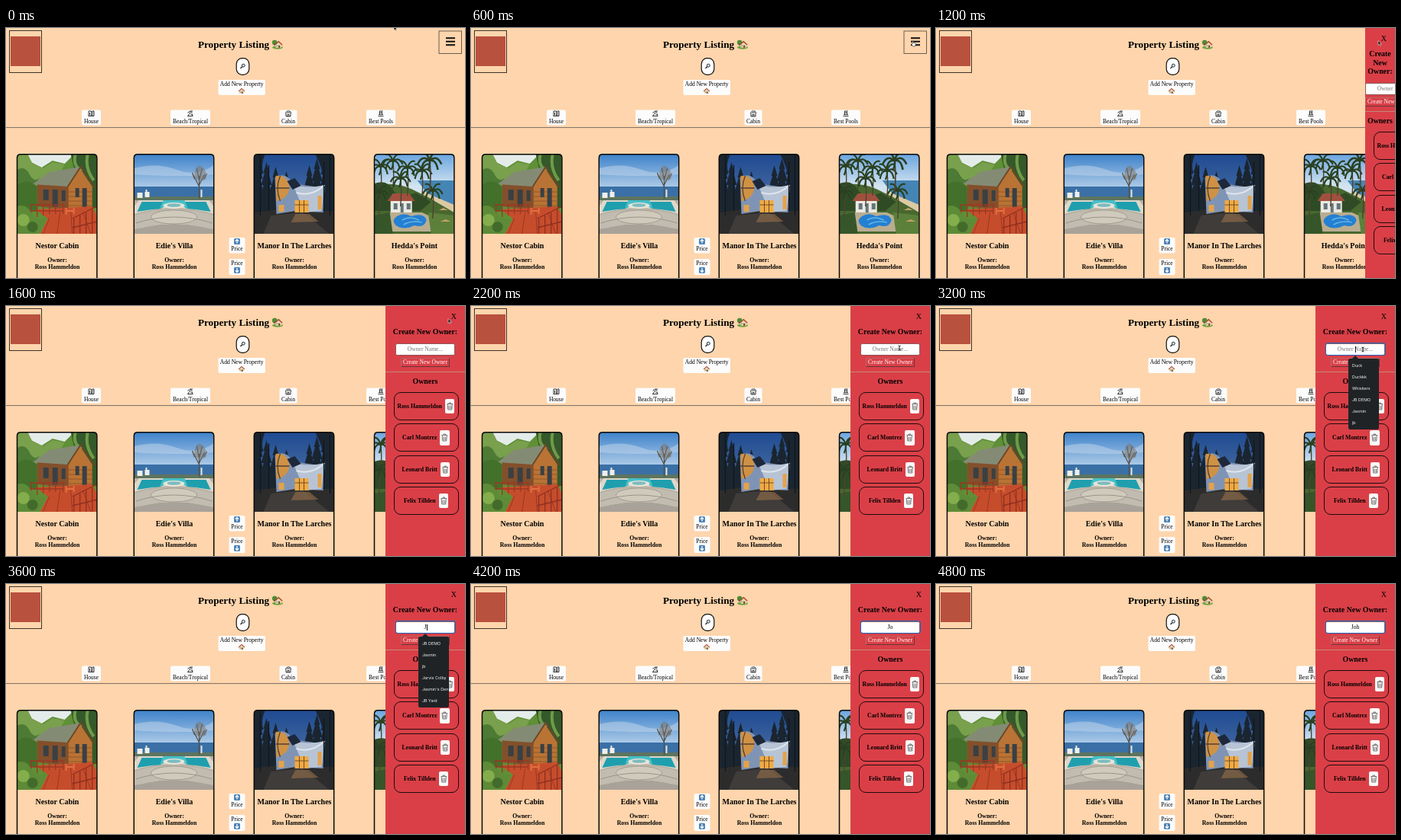
These frames come from a looping animation (600 px wide and 328 px high, 5 s). An HTML page:

```html
<!DOCTYPE html>
<html lang="en">
<head>
<meta charset="utf-8">
<title>Property Listing</title>
<style>
html, body { margin: 0; width: 100%; height: 100%; overflow: hidden; background: #fed5ac; }
.stage { position: relative; width: 600px; height: 328px; overflow: hidden; font: 7.5px "Liberation Serif", Times, serif; color: #000; }
.stage > svg { position: absolute; left: 0; top: 0; }
text { text-anchor: middle; }
.title { font-weight: bold; font-size: 13.2px; }
.name { font-weight: bold; font-size: 10px; }
.owner { font-weight: bold; font-size: 7.8px; }
.btn { fill: #fcfcfc; }
.line { fill: none; stroke: #222; stroke-width: .9; }

/* Sliding panel */
.panel { position: absolute; right: 0; top: 0; height: 328px; overflow: hidden; background: #da3f47; text-align: center; }
.panel h2 { margin: 0; font: bold 9.9px/11.5px "Liberation Serif", Times, serif; }
.panel h2:first-of-type { margin-top: 28.4px; }
.close { position: absolute; right: 11px; top: 8px; font-size: 10px; line-height: 12px; }
.field { position: relative; box-sizing: border-box; width: 78px; height: 16px; margin: 9.1px auto 0; background: #fff; border: 1px solid #8a5a5c; border-radius: 2.5px; font-size: 7.6px; line-height: 14px; }
.field span { position: absolute; left: 0; right: 0; top: 0; white-space: nowrap; }
.hint { color: #777; }
.field i { position: absolute; left: 38px; top: 3px; width: .8px; height: 8px; background: #111; }
.field i.after { left: 40px; }
.ring { position: absolute; inset: -1.5px; border: 1.8px solid #2467bd; border-radius: 3px; }
.create { box-sizing: border-box; width: 64px; height: 12.5px; margin: 3px auto 0; border: 1px outset #b56a6c; color: #fff; line-height: 10.5px; white-space: nowrap; }
.rule { height: 1px; margin: 5.5px 0 6px; background: #c58a78; }
.items { margin: 8.5px 0 0 10.5px; }
.item { box-sizing: border-box; display: flex; align-items: center; justify-content: center; width: 85px; height: 37px; margin-bottom: 4.4px; border: 1.3px solid #1c0c0d; border-radius: 9px; font-weight: bold; font-size: 7.75px; white-space: nowrap; }
.item svg { flex: none; width: 12.5px; height: 19.5px; margin-left: 4px; background: #fafafa; border-radius: 2px; }

/* Autofill list */
.list text { font: 5.4px Inter, "Liberation Sans", sans-serif; fill: #f2f2f2; text-anchor: start; }

/* One shared five second clock */
.panel, .hint, .field i, .ring, .t1, .t2, .t3, .list, .all, .recent, .cursor, .arrow, .hand, .beam { animation: 5s step-end infinite; }
.panel { animation-name: slide; }
.hint, .all { animation-name: hint; }
.ring { animation-name: focus; }
.field i { animation-name: blink; }
.field i.after, .t1, .recent { animation-name: one; }
.t2 { animation-name: two; }
.t3 { animation-name: three; }
.list { animation-name: list; }
.cursor { animation-name: move; }
.arrow { animation-name: arrow; }
.hand { animation-name: hand; }
.beam { animation-name: beam; }
@keyframes slide { 0% { width: 0 } 24% { width: 39px } 28% { width: 92px } 32%, 100% { width: 104px } }
@keyframes hint { 0% { opacity: 1 } 68%, 100% { opacity: 0 } }
@keyframes focus { 0% { opacity: 0 } 48%, 100% { opacity: 1 } }
@keyframes blink { 0% { opacity: 0 } 48% { opacity: 1 } 56% { opacity: 0 } 64% { opacity: 1 } 68%, 100% { opacity: 0 } }
@keyframes one { 0% { opacity: 0 } 68% { opacity: 1 } 76%, 100% { opacity: 0 } }
@keyframes two { 0% { opacity: 0 } 76% { opacity: 1 } 96%, 100% { opacity: 0 } }
@keyframes three { 0% { opacity: 0 } 96%, 100% { opacity: 1 } }
@keyframes list { 0% { opacity: 0 } 52% { opacity: 1 } 76%, 100% { opacity: 0 } }
@keyframes move {
  0% { transform: translate(507px, -3px) }
  4% { transform: translate(545px, 9px) }
  8% { transform: translate(576px, 16px) }
  12% { transform: translate(576px, 17px) }
  24% { transform: translate(578px, 16.5px) }
  36% { transform: translate(582px, 32px) }
  40% { transform: translate(572px, 45px) }
  44% { transform: translate(560px, 55px) }
  48%, 100% { transform: translate(558px, 57px) }
}
@keyframes arrow { 0% { opacity: 1 } 8% { opacity: 0 } 24% { opacity: 1 } 44%, 100% { opacity: 0 } }
@keyframes hand { 0% { opacity: 0 } 8% { opacity: 1 } 24%, 100% { opacity: 0 } }
@keyframes beam { 0% { opacity: 0 } 44% { opacity: 1 } 72%, 100% { opacity: 0 } }
</style>
</head>
<body>
<div class="stage">
<svg width="600" height="328" viewBox="0 0 600 328">
  <defs>
    <linearGradient id="day" x2="0" y2="1"><stop stop-color="#3f83cb"/><stop offset=".4" stop-color="#a9c8e6"/></linearGradient>
    <linearGradient id="dusk" x2="0" y2="1"><stop stop-color="#1f4b92"/><stop offset=".6" stop-color="#4a6ea3"/></linearGradient>
    <linearGradient id="coast" x2="0" y2="1"><stop stop-color="#6ba6e0"/><stop offset=".4" stop-color="#d3e4f0"/></linearGradient>
    <clipPath id="photo"><path d="M0 104V3Q0 0 3 0H101Q104 0 104 3V104Z"/></clipPath>
    <g id="home">
      <path d="M-3.4 0V3.6H3.4V0L0-3Z" fill="#efd9ae"/>
      <path d="M-4.4 .4L0-3.8 4.4 .4" fill="none" stroke="#a4492f" stroke-width="1.3"/>
      <path d="M-.2 3.6V.8H1.8V3.6Z" fill="#7b4a2b"/>
      <path d="M-2.6 .6h1.6v1.5h-1.6z" fill="#5a9fd0"/>
    </g>
    <g id="palm">
      <path d="M0 0Q2 14 0 36" fill="none" stroke="#4c4130" stroke-width="1.4"/>
      <path d="M0 0Q-8-7-13 4M0 0Q-7-2-9 10M0 0Q-3-11-10-9M0 0Q3-11 10-9M0 0Q8-7 13 4M0 0Q7-2 9 10M0 0Q1 5-2 11" fill="none" stroke="#2a4020" stroke-width="2.2"/>
    </g>
    <path id="pine" d="M0 0L4 14 2.500 14 7 30 4 30 9 52H-9L-4 30-7 30-2.500 14-4 14Z"/>
    <path id="card" d="M-.2 170V4.500Q-.2-.2 4.500-.2H99.500Q104.200-.2 104.200 4.500V170" fill="none" stroke="#0b0908" stroke-width="1.500"/>
    <path id="arrowhead" d="M0-2.600V2.600M-2.200 .4L0 2.600 2.200 .4" fill="none" stroke="#fff" stroke-width="1.300"/>
  </defs>

  <!-- Header -->
  <rect x="4.500" y="3.500" width="42" height="55" fill="none" stroke="#3d342c"/>
  <rect x="6" y="11" width="39" height="39" fill="#b9513f"/>
  <text class="title" x="297.500" y="26">Property Listing</text>
  <g transform="translate(355 21)">
    <ellipse cy="4.500" rx="7" ry="2.200" fill="#6da33e"/>
    <circle cx="-3.800" cy="-2" r="3.300" fill="#4f8c36"/>
    <path d="M-4.500 2V-.5" stroke="#6b4a2c"/>
    <use href="#home" x="1.200" y=".8" transform="scale(1.1)"/>
  </g>
  <rect x="566" y="4" width="29.500" height="29.500" fill="none" stroke="#5d5146" stroke-width=".9"/>
  <path d="M575 13.200h12M575 17.700h12M575 22.200h12" stroke="#111" stroke-width="1.900"/>
  <rect x="301.200" y="39.700" width="16.600" height="21.600" rx="7.500" fill="#fff" stroke="#111" stroke-width="1.200"/>
  <circle cx="310.300" cy="49.200" r="2" fill="#cfe3ee" stroke="#222" stroke-width=".9"/>
  <path d="M308.700 50.800L306.500 53" stroke="#222" stroke-width="1.300"/>
  <rect class="btn" x="277.500" y="68" width="61.500" height="20" rx="2"/>
  <text x="308.200" y="76">Add New Property</text>
  <use href="#home" transform="translate(308 82.800) scale(.88)"/>

  <!-- Categories -->
  <rect class="btn" x="99" y="107.500" width="25" height="20" rx="2"/>
  <rect class="btn" x="215" y="107.500" width="52" height="20" rx="2"/>
  <rect class="btn" x="357.500" y="107.500" width="23" height="20" rx="2"/>
  <rect class="btn" x="471" y="107.500" width="38" height="20" rx="2"/>
  <text x="111.500" y="125">House</text>
  <text x="241" y="125">Beach/Tropical</text>
  <text x="369" y="125">Cabin</text>
  <text x="490" y="125">Best Pools</text>
  <path class="line" d="M108 115.500V109h3.500v2.500M107.500 115.500h7.500M113 115.500v-6.500h2v6.500M109.500 111v3.500M111.500 112v3"/>
  <path class="line" d="M237 115.500h7.500M238 115l3-4.500M237.500 111q3-3 6 0M240.500 109h3.500M241 113h2.500v2"/>
  <path class="line" d="M365 112l2.500-3h3.500l2 3M366 112v4h6v-4M368 116v-2.500h2v2.500M367 111h4.500"/>
  <path class="line" d="M486.500 115.500h7M487 113.500h6M488.500 113v-4h4M491.500 113v-3.500M488.500 111h3"/>
  <path d="M0 130.600H600" stroke="#756c62"/>

  <!-- Wooden cabin -->
  <g transform="translate(14.700 166)">
    <g clip-path="url(#photo)">
      <rect width="104" height="104" fill="#5f8f36"/>
      <path d="M12 0H74L62 12 46 8 32 17 18 10Z" fill="#e4ecea"/>
      <path d="M0 0H14L20 12 34 18 46 10 62 13 50 34 0 48Z" fill="#79a04c"/>
      <path d="M0 20Q10 14 16 26T30 30L20 42 0 46Z" fill="#4d7a34"/>
      <path d="M70 0H104V70H86Z" fill="#34592a"/>
      <path d="M76 0Q72 14 84 22M92 0Q88 18 100 34" stroke="#6f9a48" stroke-width="4" fill="none"/>
      <path d="M0 40Q14 30 26 42V74H0Z" fill="#43702a"/>
      <path d="M26 38L68 40V73L26 68Z" fill="#83502b"/>
      <path d="M67 42L82 18 98 42V73H67Z" fill="#b97335"/>
      <path d="M67 49H98M67 55H98M67 61H98M67 67H98" stroke="#8a4e22" stroke-width=".8"/>
      <path d="M20 39L42 23 83 16 66 42Z" fill="#848b74"/>
      <path d="M66 42L83 16 101 43" fill="none" stroke="#6d4525" stroke-width="1.800"/>
      <path d="M34 46h7v14h-7zM46 46h7v22h-7zM58 47h5v14h-5zM76 44h5v12h-5zM85 44h6v28h-6z" fill="#394044"/>
      <path d="M24 72L98 68 104 80V104H30L40 84Z" fill="#c64d2c"/>
      <path d="M42 84L34 104M56 76L52 104M70 76L72 104M86 76L96 104" stroke="#9a3623"/>
      <path d="M16 66H62M16 74H60M18 66V84M26 66V82M34 66V80M42 66V78M50 66V78M60 66V78" stroke="#9b3822" stroke-width="1.300"/>
      <path d="M72 84L104 68M72 96L104 88M74 84V104M82 80V104M90 76V104M98 72V104" stroke="#8f2f20" stroke-width="1.300"/>
      <path d="M64 70v9M74 70v8M64 74h10" stroke="#e0703f" stroke-width="2"/>
      <path d="M0 68Q12 64 18 76T38 84L28 104H0Z" fill="#5d8b37"/>
      <circle cx="8" cy="86" r="8" fill="#84ad4c"/><circle cx="20" cy="95" r="7" fill="#426b2b"/>
    </g>
    <use href="#card"/>
  </g>

  <!-- Seaside pool -->
  <g transform="translate(167.500 166)">
    <g clip-path="url(#photo)">
      <rect width="104" height="104" fill="url(#day)"/>
      <path d="M0 18Q30 10 56 20T104 14V26Q60 30 0 26Z" fill="#c3d8ec" opacity=".5"/>
      <rect y="42" width="104" height="20" fill="#3a70a6"/>
      <path d="M0 55H104V104H0Z" fill="#b7b0a4"/>
      <path d="M0 55H104V60H0Z" fill="#5d7460"/>
      <path d="M6 60H98L104 68V78Q52 62 0 78V68Z" fill="#dfd8ca"/>
      <path d="M10 62H38Q44 72 24 72L4 75Z" fill="#1f9fae"/>
      <path d="M94 62H66Q60 72 80 72L100 75Z" fill="#1f9fae"/>
      <path d="M38 60H66L70 70Q52 64 34 70Z" fill="#46c0c8"/>
      <ellipse cx="52" cy="67" rx="14" ry="4" fill="#e9e4d8"/><ellipse cx="52" cy="66.500" rx="9" ry="2.300" fill="#7dbcc0"/>
      <path d="M0 80Q52 64 104 80V104H0Z" fill="#c2bcb0"/>
      <ellipse cx="52" cy="82" rx="30" ry="9" fill="#d0cabd" stroke="#a09a8f"/>
      <path d="M2 90Q52 74 102 90M14 96Q52 88 90 96" fill="none" stroke="#9b9487"/>
      <path d="M0 98L36 92H68L104 98V104H0Z" fill="#a9a298"/>
      <path d="M16 56V46M88 56V46" stroke="#e8e6df" stroke-width="2"/>
      <path d="M4 50h7v7H4zM14 49h6v7h-6z" fill="#f0eee7"/>
      <path d="M85 58V28M85 42L78 28M85 40L92 26M85 34L82 18M85 34L89 18M79 32L76 24M91 32L95 25" fill="none" stroke="#554c43" stroke-width="1.200"/>
      <path d="M78 30Q80 12 87 15 96 20 94 32 86 38 78 30Z" fill="#7c7468" opacity=".5"/>
    </g>
    <use href="#card"/>
  </g>

  <!-- Forest house -->
  <g transform="translate(324.500 166)">
    <g clip-path="url(#photo)">
      <rect width="104" height="104" fill="url(#dusk)"/>
      <g fill="#1a2530">
        <use href="#pine" x="4" y="2"/><use href="#pine" x="16" y="10"/><use href="#pine" x="28" y="16"/>
        <use href="#pine" x="42" y="22"/><use href="#pine" x="72" y="14"/><use href="#pine" x="82" y="5"/>
        <use href="#pine" x="94" y="-4"/><use href="#pine" x="102" y="4"/>
        <path d="M0 0H14Q8 14 12 24L0 36ZM80 0H104V70H92Q96 30 80 0Z"/>
        <path d="M0 46H104V104H0Z"/>
      </g>
      <path d="M0 76L30 72 104 74V104H0Z" fill="#2d2c2c"/>
      <path d="M22 80L64 76 98 104H12Z" fill="#3f3c3a"/>
      <path d="M27 30Q42 22 50 38L92 44 90 76 54 74 29 78Z" fill="#7f94b4"/>
      <path d="M50 38Q66 46 92 40L88 74 66 76Z" fill="#b7c4d5"/>
      <path d="M28 28Q44 26 46 44 44 58 29 61Z" fill="#cf9245"/>
      <path d="M34 28Q27 44 34 61M28 44H46" fill="none" stroke="#554034" stroke-width="1.300"/>
      <path d="M43 35L53 31 61 41 50 46Z" fill="#1d283a"/>
      <path d="M53 60H71V76H53Z" fill="#efaa45"/>
      <path d="M59 60V76M65 60V76M53 66H71" stroke="#684320" stroke-width=".9"/>
      <path d="M83 54h5v18h-5zM32 66h7v9h-7z" fill="#e4a24b"/>
      <path d="M55 50Q75 56 92 40" fill="none" stroke="#dfe5ec" stroke-width="2"/>
      <path d="M54 78L72 78 84 88 48 89Z" fill="#98704a" opacity=".6"/>
      <path d="M8 0V80M19 14V74M91 10V74M99 0V80" stroke="#10171d" stroke-width="1.300"/>
    </g>
    <use href="#card"/>
  </g>

  <!-- Palm resort -->
  <g transform="translate(481.700 166)">
    <g clip-path="url(#photo)">
      <rect width="104" height="104" fill="url(#coast)"/>
      <path d="M56 34H104V70L74 58Z" fill="#4585b4"/>
      <path d="M62 48L104 66V78L58 58Z" fill="#dcc9a2"/>
      <path d="M0 42Q24 34 50 46L70 56 104 76V104H0Z" fill="#48682f"/>
      <path d="M0 38Q16 32 24 46T54 50L74 62 60 74H0Z" fill="#2f4b26"/>
      <path d="M21 60H49V76H21Z" fill="#ece9e1"/>
      <path d="M17 61L24 51H45L53 61Z" fill="#a0503d"/>
      <path d="M25 64h5v8h-5zM34 64h4v12h-4zM42 64h5v8h-5z" fill="#62757c"/>
      <path d="M20 76H62L84 86 78 101H18Z" fill="#b9ad90"/>
      <path d="M28 82Q38 75 48 81 65 76 68 86 65 97 52 93 38 100 28 93 22 87 28 82Z" fill="#2480d2"/>
      <path d="M36 86Q46 80 58 86M38 92Q48 86 62 89" fill="none" stroke="#67b4e0" stroke-width="1.600"/>
      <path d="M70 76L104 80V104H74Z" fill="#5c803a"/>
      <path d="M0 80L20 76 24 104H0Z" fill="#36562a"/>
      <use href="#palm" x="8" y="16"/><use href="#palm" x="24" y="9"/>
      <use href="#palm" x="43" y="18"/><use href="#palm" x="62" y="22"/>
      <use href="#palm" x="34" y="32"/><use href="#palm" x="76" y="48"/>
      <use href="#palm" transform="translate(6 50) scale(.9)"/><use href="#palm" transform="translate(72 8) scale(1.2)"/>
      <path d="M84 73l6-3 6 3zM86 88l7-3 7 3z" fill="#c6a16a"/>
    </g>
    <use href="#card"/>
  </g>

  <g class="name">
    <text x="67" y="289.300">Nestor Cabin</text>
    <text x="220" y="289.300">Edie's Villa</text>
    <text x="377" y="289.300">Manor In The Larches</text>
    <text x="534" y="289.300">Hedda's Point</text>
  </g>
  <g class="owner">
    <g id="by"><text x="67" y="306.800">Owner:</text><text x="67" y="315.800">Ross Hammeldon</text></g>
    <use href="#by" x="153"/><use href="#by" x="310"/><use href="#by" x="467"/>
  </g>

  <!-- Sorting -->
  <rect class="btn" x="291.500" y="275" width="21" height="20.500" rx="2"/>
  <rect x="298" y="276" width="8" height="8" rx="1.500" fill="#4d82b4"/>
  <use href="#arrowhead" transform="translate(302 280) scale(1 -1)"/>
  <text x="302" y="291.500">Price</text>
  <rect class="btn" x="291.500" y="303" width="21" height="21" rx="2"/>
  <text x="302" y="311">Price</text>
  <rect x="298" y="313.700" width="8" height="8" rx="1.500" fill="#4d82b4"/>
  <use href="#arrowhead" x="302" y="317.700"/>
</svg>

<div class="panel">
  <span class="close">X</span>
  <h2>Create New Owner:</h2>
  <div class="field">
    <span class="hint">Owner Name...</span>
    <span class="t1">J</span><span class="t2">Jo</span><span class="t3">Joh</span>
    <i></i><i class="after"></i><b class="ring"></b>
  </div>
  <div class="create">Create New Owner</div>
  <div class="rule"></div>
  <h2>Owners</h2>
  <div class="items">
    <div class="item">Ross Hammeldon<svg viewBox="0 0 12.500 19.500"><path id="bin" d="M2.500 6.500h7.500M5 6v-1h2.500v1M3.200 7l.6 7h4.900l.6-7M5.200 8.500v4.500M7.300 8.500v4.500" fill="none" stroke="#666" stroke-width=".9"/></svg></div>
    <div class="item">Carl Montrez<svg viewBox="0 0 12.500 19.500"><use href="#bin"/></svg></div>
    <div class="item">Leonard Britt<svg viewBox="0 0 12.500 19.500"><use href="#bin"/></svg></div>
    <div class="item">Felix Tillden<svg viewBox="0 0 12.500 19.500"><use href="#bin"/></svg></div>
  </div>
</div>

<svg width="600" height="328" viewBox="0 0 600 328">
  <g class="list">
    <path d="M544 69L548 65 552 69H576.500Q579 69 579 71.500V159.500Q579 162 576.500 162H541.500Q539 162 539 159.500V71.500Q539 69 541.500 69Z" fill="#202326"/>
    <g class="all">
      <text x="544" y="80">Duck</text><text x="544" y="95">Duckkk</text><text x="544" y="110">Whiskers</text>
      <text x="544" y="125">JB DEMO</text><text x="544" y="140">Jasmin</text><text x="544" y="155">jb</text>
    </g>
    <g class="recent">
      <text x="544" y="80">JB DEMO</text><text x="544" y="95">Jasmin</text><text x="544" y="110">jb</text>
      <text x="544" y="125">Jarvis Colby</text><text x="544" y="140">Jasmin's Den</text><text x="544" y="155">JB Yard</text>
    </g>
  </g>
  <g class="cursor">
    <path class="arrow" d="M0 0V6L1.400 4.800 2.300 6.800 3.300 6.300 2.500 4.400H4.400Z" fill="#111" stroke="#fff" stroke-width=".5"/>
    <path class="hand" d="M1 0Q2-.5 2.100 .6V2.300L4.800 3Q5.600 3.400 5.200 5L4.600 7H1.700L-.6 4.200Q-.2 3.200 1 4.200Z" fill="#fff" stroke="#222" stroke-width=".6"/>
    <path class="beam" d="M-1.500-3Q0-3 0-2 0-3 1.500-3M0-2.500V2.500M-1.500 3Q0 3 0 2 0 3 1.500 3" fill="none" stroke="#111" stroke-width=".9"/>
  </g>
</svg>
</div>
</body>
</html>
```
